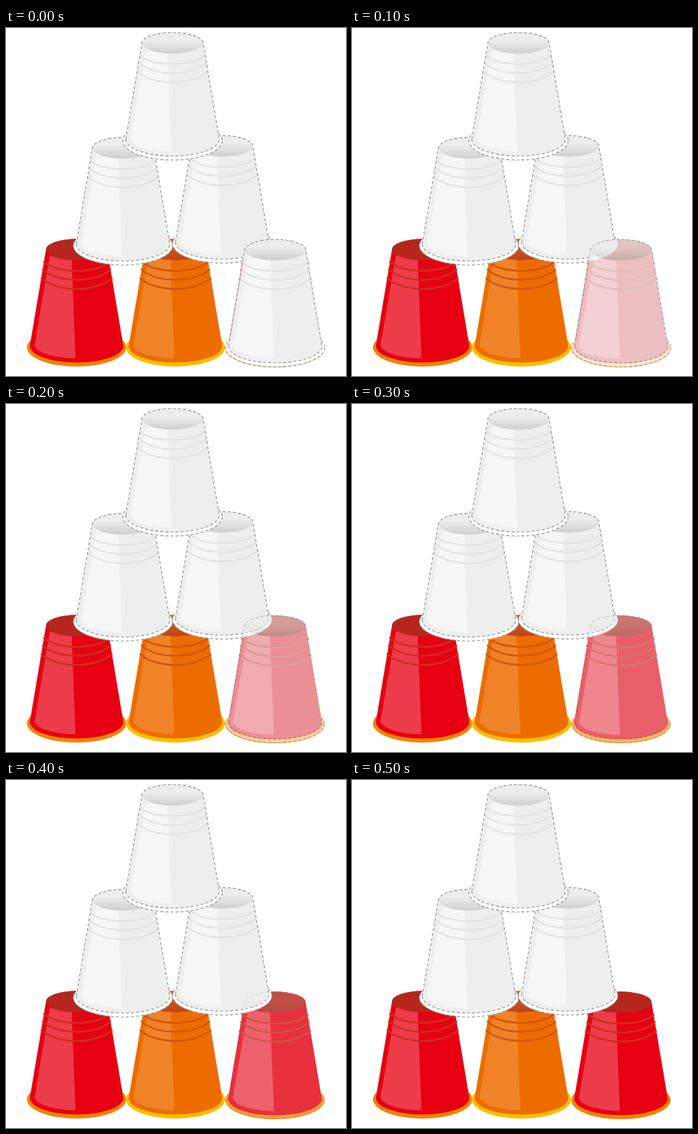
Write an HTML page that moves like this. It is 469 px wide and 479 px high and loops after 0.6 s.

```html
<!DOCTYPE html>
<html lang="en">
<head>
<meta charset="utf-8">
<title>Stacking cups</title>
<style>
html, body { margin: 0; width: 100%; height: 100%; overflow: hidden; background: #fff; }
svg { display: block; }
</style>
</head>
<body>
<svg id="stage" width="469" height="479" viewBox="0 0 469 479">
  <defs>
    <linearGradient id="paleRim" x2="0" y2="1">
      <stop offset=".35" stop-color="#ededed"/><stop offset="1" stop-color="#cfcfcf"/>
    </linearGradient>
    <linearGradient id="orangeRim" x2="0" y2="1">
      <stop offset="0" stop-color="#dc640c"/><stop offset="1" stop-color="#bf421b"/>
    </linearGradient>
  </defs>
</svg>
<script>
const stage = document.getElementById('stage');

const styles = {
  red: { brim: '#f08300', body: '#e60012', shine: '#ec3c4a', ring: '#cb301d', rim: '#b6261d' },
  orange: { brim: '#fabe00', body: '#ed6c00', shine: '#f08327', ring: '#d05512', rim: 'url(#orangeRim)' },
  pale: { brim: '#fff', body: '#eeeeee', shine: '#f6f6f6', ring: '#e4e4e4', rim: 'url(#paleRim)', dashed: true }
};

// Half width, end height and depth of each ring
const rings = [[45.2, 17.6, 12], [46.8, 28, 14], [48.6, 40, 14.5]];

const outline = 'M-64.5 133L-42.3 1A42.3 15 0 0 1 42.3 1L64.5 133A64.5 23 0 0 1 -64.5 133Z';
const shine = 'M-37 9L-7 9L-1.5 150A57 19 0 0 1 -58 132Z';

function ringPath([w, y, d]) {
  const cx = w * 0.55, cy = y + d * 4 / 3;
  return `M${-w} ${y}C${-cx} ${cy} ${cx} ${cy} ${w} ${y}`;
}

// x, y is the centre of the small end
function addCup(x, y, name) {
  const s = styles[name];
  const dash = s.dashed
    ? 'fill="none" stroke="#8f8f8f" stroke-width="1.1" stroke-dasharray="4 3"' : '';
  const brim = 'cx="0" cy="135" rx="68.5" ry="26.5"';
  const g = document.createElementNS('http://www.w3.org/2000/svg', 'g');
  g.setAttribute('transform', `translate(${x} ${y})`);
  g.innerHTML = `
    <ellipse ${brim} fill="${s.brim}"/>
    ${dash && `<ellipse ${brim} ${dash}/>`}
    <path d="${outline}" fill="${s.body}"/>
    <path d="${shine}" fill="${s.shine}"/>
    <ellipse cy=".4" rx="42.3" ry="14.7" fill="${s.rim}"/>
    <path d="${rings.map(ringPath).join('')}" fill="none" stroke="${s.ring}" stroke-width="2.4" stroke-linecap="round"/>
    ${dash && `<path d="${outline}" ${dash}/>`}`;
  stage.append(g);
  return g;
}

addCup(97.4, 304.6, 'red');
addCup(233.8, 304.6, 'orange');
addCup(371, 305.6, 'red');
addCup(161.4, 164.7, 'pale');
addCup(298.2, 162, 'pale');
addCup(229.7, 20.2, 'pale');
const cover = addCup(371.3, 305, 'pale');

cover.animate({ opacity: [1, 0] },
  { duration: 600, easing: 'steps(6, jump-none)', iterations: Infinity });
</script>
</body>
</html>
```
